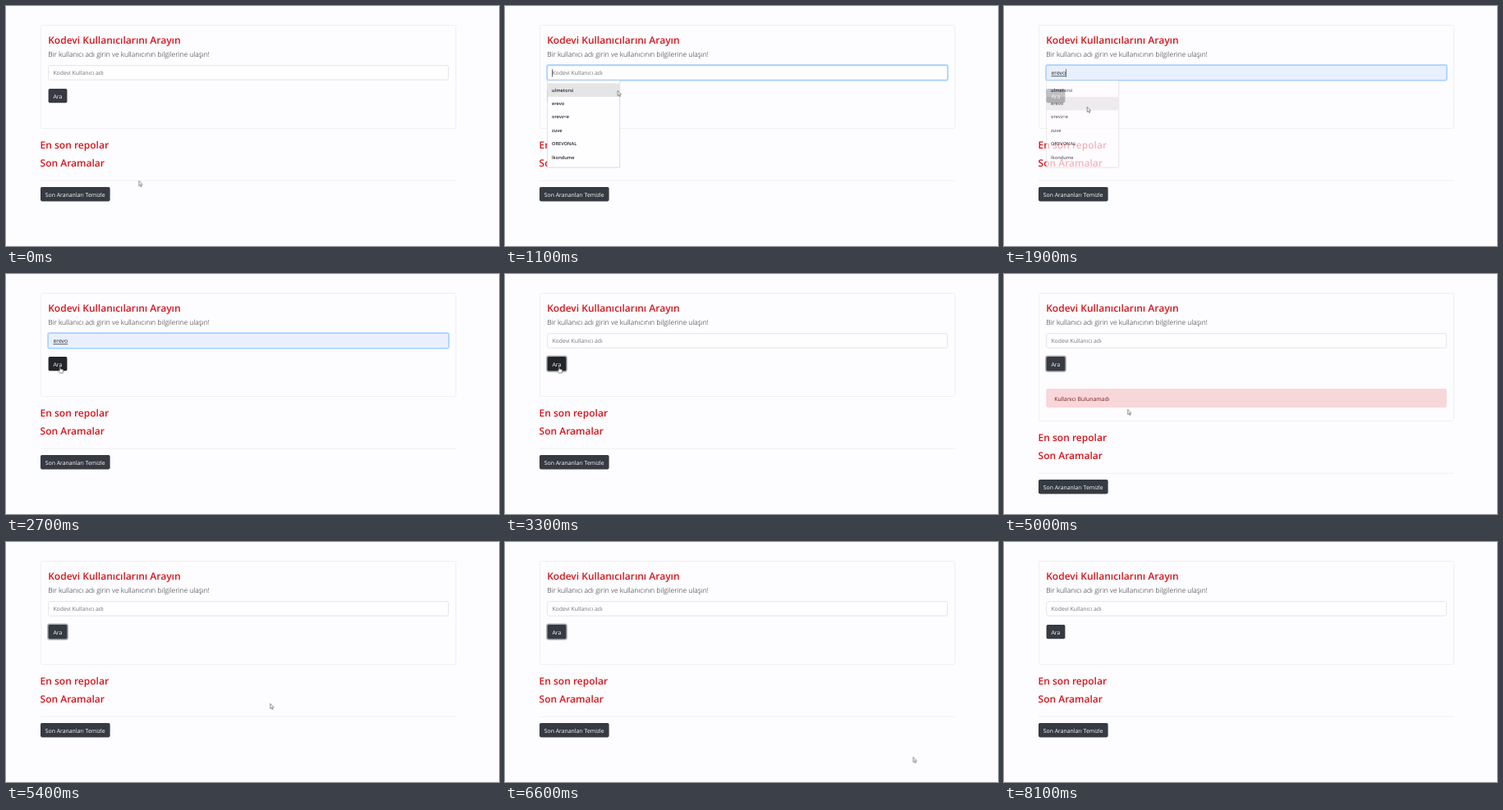
These frames come from a looping animation (600 px wide and 293 px high, 8200 ms). An HTML page:

```html
<!DOCTYPE html>
<html lang="tr">
<head>
<meta charset="utf-8">
<title>Kullanıcı arama</title>
<style>
html, body { margin: 0; width: 100%; height: 100%; overflow: hidden; background: #fdfcfe; }
svg { display: block; width: 100vw; height: 100vh; }
text { font: 6.87px "Open Sans", "Noto Sans", sans-serif; white-space: pre; text-rendering: geometricPrecision; }
.title { font-size: 12px; font-weight: 600; fill: #d8141a; }
.lead { font-size: 8.51px; font-weight: 300; fill: #212529; }
.hint { fill: #6f757c; }
.typed { fill: #212529; }
.list text { font-size: 5.65px; font-weight: 600; fill: #26262a; }
.btn { fill: #363a42; }
.label { fill: #fff; }

/* One shared 8.2 s clock; states switch hard, the pointer glides. */
.state { animation: 8.2s step-end infinite; }
.focus { animation-name: focus; }
.hint { animation-name: hint; }
.fill { animation-name: fill; }
.first { animation-name: first; }
.second { animation-name: second; }
.caret { animation-name: caret; }
.caret2 { animation-name: caret2; }
.row1 { animation-name: row1; }
.row2 { animation-name: row2; }
.ring { animation-name: ring; }
.alert { animation-name: alert; }
.lower { animation-name: lower; }
.card { animation-name: card; }
.arrow { animation-name: arrow; }
.hand { animation-name: hand; }
.beam { animation-name: beam; }
.list { animation: list 8.2s linear infinite; }
.ara { animation: ara 8.2s linear infinite; }
.pointer { animation: pointer 8.2s linear infinite; }

@keyframes focus { 0%, 34.05% { opacity: 0 } 7.22% { opacity: 1 } }
@keyframes hint { 0%, 34.05% { opacity: 1 } 14.53% { opacity: 0 } }
@keyframes fill { 0%, 34.05% { opacity: 0 } 14.53% { opacity: 1 } }
@keyframes first { 0%, 15.75% { opacity: 0 } 14.53% { opacity: 1 } }
@keyframes second { 0%, 34.05% { opacity: 0 } 15.75% { opacity: 1 } }
@keyframes caret { 0%, 14.53% { opacity: 0 } 8.44% { opacity: 1 } }
@keyframes caret2 { 0%, 26.73% { opacity: 0 } 20.63% { opacity: 1 } }
@keyframes row1 { 0%, 15.75% { opacity: 0 } 12.1% { opacity: 1 } }
@keyframes row2 { 0%, 25.61% { opacity: 0 } 15.75% { opacity: 1 } }
@keyframes ring { 0%, 98.68% { opacity: 0 } 34.05% { opacity: 1 } }
@keyframes alert { 0%, 63.31% { opacity: 0 } 43.8% { opacity: 1 } }
@keyframes lower { 0%, 63.31% { transform: none } 43.8% { transform: translateY(30px) } }
@keyframes card { 0%, 63.31% { height: 126px } 43.8% { height: 156px } }
@keyframes list {
  0%, 8.43% { opacity: 0 }
  8.44%, 21.95% { opacity: 1 }
  23.17% { opacity: .7 }
  25.61%, 100% { opacity: 0 }
}
@keyframes ara {
  0%, 27.4% { fill: #363a42 }
  29.2%, 44.5% { fill: #22262b }
  46.3%, 100% { fill: #363a42 }
}
@keyframes arrow {
  0%, 8.44%, 44.5% { opacity: 1 }
  5.5%, 27.4%, 81.6% { opacity: 0 }
}
@keyframes hand { 0%, 44.5% { opacity: 0 } 27.4% { opacity: 1 } }
@keyframes beam { 0%, 8.44% { opacity: 0 } 5.5% { opacity: 1 } }
@keyframes pointer {
  0% { transform: translate(161.5px, 213.5px) }
  6.1%, 8.5% { transform: translate(133px, 82px) }
  12.2%, 13.41% { transform: translate(137px, 103px) }
  17.07%, 23.17% { transform: translate(101px, 123px) }
  29.27%, 41.46% { transform: translate(65.8px, 113px) }
  46.34%, 51.22% { transform: translate(68.5px, 117.5px) }
  60.98% { transform: translate(150px, 165px) }
  65.85%, 74.39% { transform: translate(321.3px, 197px) }
  81.6%, 100% { transform: translate(528px, 274px) }
}
</style>
</head>
<body>
<svg viewBox="0 0 600 293" preserveAspectRatio="none">
  <rect class="state card" x="42.5" y="23.5" width="505" height="126" rx="1.8" fill="#fdfcfe" stroke="#efeef2" stroke-width=".9"/>
  <text class="title" x="51.2" y="45.5">Kodevi Kullanıcılarını Arayın</text>
  <text class="lead" x="51.2" y="62.2">Bir kullanıcı adı girin ve kullanıcının bilgilerine ulaşın!</text>

  <!-- search field -->
  <rect x="51.7" y="72.7" width="486.7" height="17.4" rx="1.9" fill="#fefeff" stroke="#dcdfe4" stroke-width=".8"/>
  <g class="state focus">
    <rect x="51" y="72" width="488" height="18.8" rx="2.4" fill="none" stroke="#b9dbff" stroke-width="1.8"/>
    <rect x="51.7" y="72.7" width="486.7" height="17.4" rx="1.9" fill="#fefeff" stroke="#8ec3fb" stroke-width=".7"/>
  </g>
  <rect class="state fill" x="52" y="73" width="486" height="16.8" rx="1.6" fill="#e8f0fe"/>
  <text class="state hint" x="57.4" y="84.4">Kodevi Kullanıcı adı</text>
  <text class="state typed first" x="57.4" y="84.4">ulmetorsi</text>
  <text class="state typed second" x="57.4" y="84.4" text-decoration="underline">erevo</text>
  <rect class="state caret" x="57" y="77" width=".7" height="9.6" fill="#333"/>
  <rect class="state caret2" x="75" y="77" width=".7" height="9.6" fill="#333"/>

  <!-- search button -->
  <rect class="state ring" x="50.2" y="99.5" width="25.6" height="20.2" rx="2.9" fill="#a6a9ac"/>
  <rect class="ara" x="51.6" y="100.9" width="22.8" height="17.4" rx="1.8"/>
  <text class="label" x="57.5" y="112.6">Ara</text>

  <g class="state alert">
    <rect x="51.8" y="140.3" width="486.4" height="22.4" rx="1.8" fill="#f8d7da" stroke="#f5c9ce" stroke-width=".6"/>
    <text x="61.2" y="154.5" fill="#721c24">Kullanıcı Bulunamadı</text>
  </g>

  <g class="state lower">
    <text class="title" x="41.6" y="173.5">En son repolar</text>
    <text class="title" x="41.6" y="196.1">Son Aramalar</text>
    <rect x="42" y="212.8" width="506" height=".7" fill="#ebeaee"/>
    <rect class="btn" x="42" y="221" width="84.6" height="17.4" rx="1.8"/>
    <text class="label" x="47.8" y="232.5">Son Arananları Temizle</text>
  </g>

  <!-- suggestions -->
  <g class="list">
    <rect x="51" y="91.2" width="89.4" height="106.6" rx="1" fill="#000" opacity=".07"/>
    <rect x="51.6" y="91" width="88" height="106" rx=".6" fill="#fefdff" stroke="#d6d5d9" stroke-width=".6"/>
    <rect class="state row1" x="51.9" y="94.5" width="87.4" height="16.4" fill="#e5e4e6"/>
    <rect class="state row2" x="51.9" y="110.9" width="87.4" height="16.4" fill="#e5e4e6"/>
    <text x="57" y="104.6">ulmetorsi</text>
    <text x="57" y="121">erevo</text>
    <text x="57" y="137.4">orevz&lt;e</text>
    <text x="57" y="153.8">zuve</text>
    <text x="57" y="170.2">OREVONAL</text>
    <text x="57" y="186.6">lkondume</text>
  </g>

  <g class="pointer">
    <path class="state arrow" d="M.3 .3V6.4L1.7 5.2L2.7 7.5L3.7 7L2.7 4.8H4.5Z" fill="#fff" stroke="#38383d" stroke-width=".55"/>
    <path class="state hand" d="M-.6 .6Q0-.3.6.6V3L3.4 3.6Q4.1 3.9 3.9 5L3.3 8H-.3L-2.2 5.2Q-2.3 4.2-1.4 4.5L-.6 5.2Z" fill="#fff" stroke="#222" stroke-width=".5"/>
    <path class="state beam" d="M-1.3-3.8H1.3M0-3.8V3.8M-1.3 3.8H1.3" fill="none" stroke="#333" stroke-width=".7"/>
  </g>
</svg>
</body>
</html>
```
